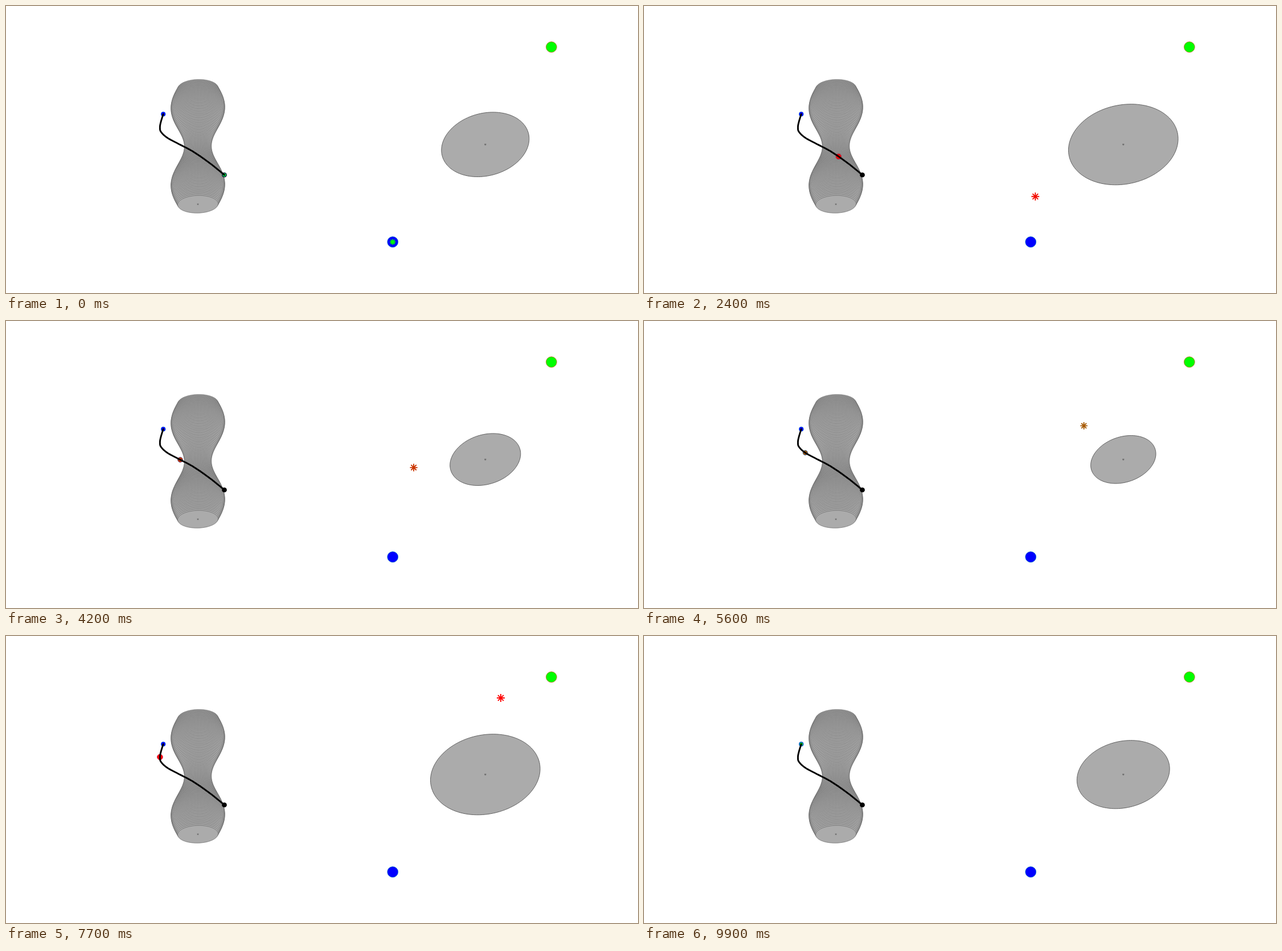
An HTML page with a canvas that plays this animation: 1110x505 px, repeating every 10 s.

```html
<!DOCTYPE html>
<html lang="en">
<head>
<meta charset="utf-8">
<title>Path around a vase</title>
<style>
html, body { margin: 0; width: 100%; height: 100%; overflow: hidden; background: #fff; }
canvas { display: block; }
</style>
</head>
<body>
<canvas id="stage" width="1110" height="505"></canvas>
<script>
const ctx = document.getElementById('stage').getContext('2d');
const TAU = 2 * Math.PI;
const LOOP = 10000, STEP = 100;
const CENTER = { x: 841.8, y: 243.7 };
const BLUE_EDGE = '#0072bd', ORANGE_EDGE = '#d95319';

// time in s, marker on the vase view (x, y), star on the section view (x, y)
const KEYS = [
  [0, 383.5, 297.2, 679.2, 415.2],
  [1.5, 358.3, 276.8, 682.6, 367.3],
  [3.1, 328.3, 256, 694.2, 308],
  [4.4, 302.3, 242.2, 722, 248],
  [5.6, 283.2, 231.8, 772.6, 184.4],
  [6.9, 271.8, 220.9, 833.2, 131.3],
  [7.7, 270.4, 213, 869, 109],
  [8.6, 271.9, 204.3, 907.2, 92],
  [9.9, 276.2, 190.2, 958, 72.2]
];

function slope(i, column) {
  const a = KEYS[Math.max(i - 1, 0)], b = KEYS[Math.min(i + 1, KEYS.length - 1)];
  return (b[column] - a[column]) / (b[0] - a[0]);
}

// Cubic Hermite interpolation of one column of KEYS
function sample(t, column) {
  let i = 0;
  while (i < KEYS.length - 2 && t > KEYS[i + 1][0]) i++;
  const a = KEYS[i], b = KEYS[i + 1], span = b[0] - a[0];
  const u = (t - a[0]) / span, v = 1 - u;
  return v * v * (1 + 2 * u) * a[column] + u * u * (1 + 2 * v) * b[column]
    + u * v * span * (v * slope(i, column) - u * slope(i + 1, column));
}

function paint(fill, stroke, width = 1) {
  if (fill) { ctx.fillStyle = fill; ctx.fill(); }
  if (stroke) { ctx.strokeStyle = stroke; ctx.lineWidth = width; ctx.stroke(); }
}

function circle(x, y, r, fill, stroke, width) {
  ctx.beginPath();
  ctx.arc(x, y, r, 0, TAU);
  paint(fill, stroke, width);
}

// Ellipse with half extents w and h, raised by `lift` at its right end
function slantedEllipse(x, y, w, h, lift, lineWidth) {
  const phase = Math.asin(lift / h);
  ctx.beginPath();
  for (let i = 0; i < 120; i++) {
    const a = i / 120 * TAU;
    ctx.lineTo(x + w * Math.cos(a), y + h * Math.sin(a - phase));
  }
  ctx.closePath();
  paint('#ababab', '#555', lineWidth);
}

function star(x, y, r, color, width) {
  ctx.beginPath();
  for (let i = 0; i < 4; i++) {
    const dx = r * Math.cos(i * TAU / 8), dy = r * Math.sin(i * TAU / 8);
    ctx.moveTo(x - dx, y - dy);
    ctx.lineTo(x + dx, y + dy);
  }
  paint(null, color, width);
}

function drawVase() {
  const rings = 94;
  for (let i = rings; i >= 0; i--) {
    const z = i / rings * 1.5 * TAU;
    const w = 35.5 + 11.8 * Math.sin(z);
    slantedEllipse(337, 348.8 - 21.65 * z, w, w * 0.437, w * 0.022, 0.6);
  }
  star(337, 348.8, 1.5, '#666', 0.7);
}

function drawCurve() {
  ctx.beginPath();
  for (let i = 0; i <= 99; i++) ctx.lineTo(sample(i / 10, 1), sample(i / 10, 2));
  ctx.lineCap = ctx.lineJoin = 'round';
  paint(null, '#000', 2.9);
  ctx.lineCap = 'butt';
}

function sectionAt(t) {
  const a = TAU / 6.6 * (t - 1.75);
  const w = 77.9 + 23.1 * Math.cos(a) - 1.33 * Math.cos(2 * a);
  return { w, h: w * 0.738 };
}

// 0 far from the section, 1 close to it
function danger(x, y, { w, h }) {
  const u = (x - CENTER.x) / w, v = (y - CENTER.y) / h, c = -10 / h;
  const distance = Math.sqrt((u * u + v * v - 2 * c * u * v) / (1 - c * c));
  return Math.min(1, Math.max(0, 0.65 - 1.6 * (distance - 2.12)));
}

function draw(t) {
  const [markerX, markerY, starX, starY] = [1, 2, 3, 4].map(column => sample(t, column));
  const section = sectionAt(t);
  const near = danger(starX, starY, section);
  const color = `rgb(${255 * near}, ${255 * (1 - near)}, 0)`;
  const hot = near ** 4;
  const edge = `rgb(${210 * hot}, ${114 * (1 - hot)}, ${189 - 139 * hot})`;

  ctx.fillStyle = '#fff';
  ctx.fillRect(0, 0, 1110, 505);

  drawVase();
  circle(276.2, 190.2, 3.9, '#00f', BLUE_EDGE, 0.6);
  circle(383.5, 297.3, 4.3, '#000');
  circle(markerX, markerY, 3 + 1.8 * near, color, edge, 0.9);
  drawCurve();

  slantedEllipse(CENTER.x, CENTER.y, section.w, section.h, 10, 0.9);
  star(CENTER.x, CENTER.y, 1.7, '#666', 0.8);
  circle(679.2, 415.2, 9.4, '#00f', BLUE_EDGE, 0.7);
  circle(957.9, 72.2, 9.4, '#0f0', ORANGE_EDGE, 0.7);
  star(starX, starY, 5 + 2 * near, color, 1.9);
}

function tick() {
  draw(Math.floor(performance.now() % LOOP / STEP) * STEP / 1000);
  requestAnimationFrame(tick);
}
tick();
</script>
</body>
</html>
```
